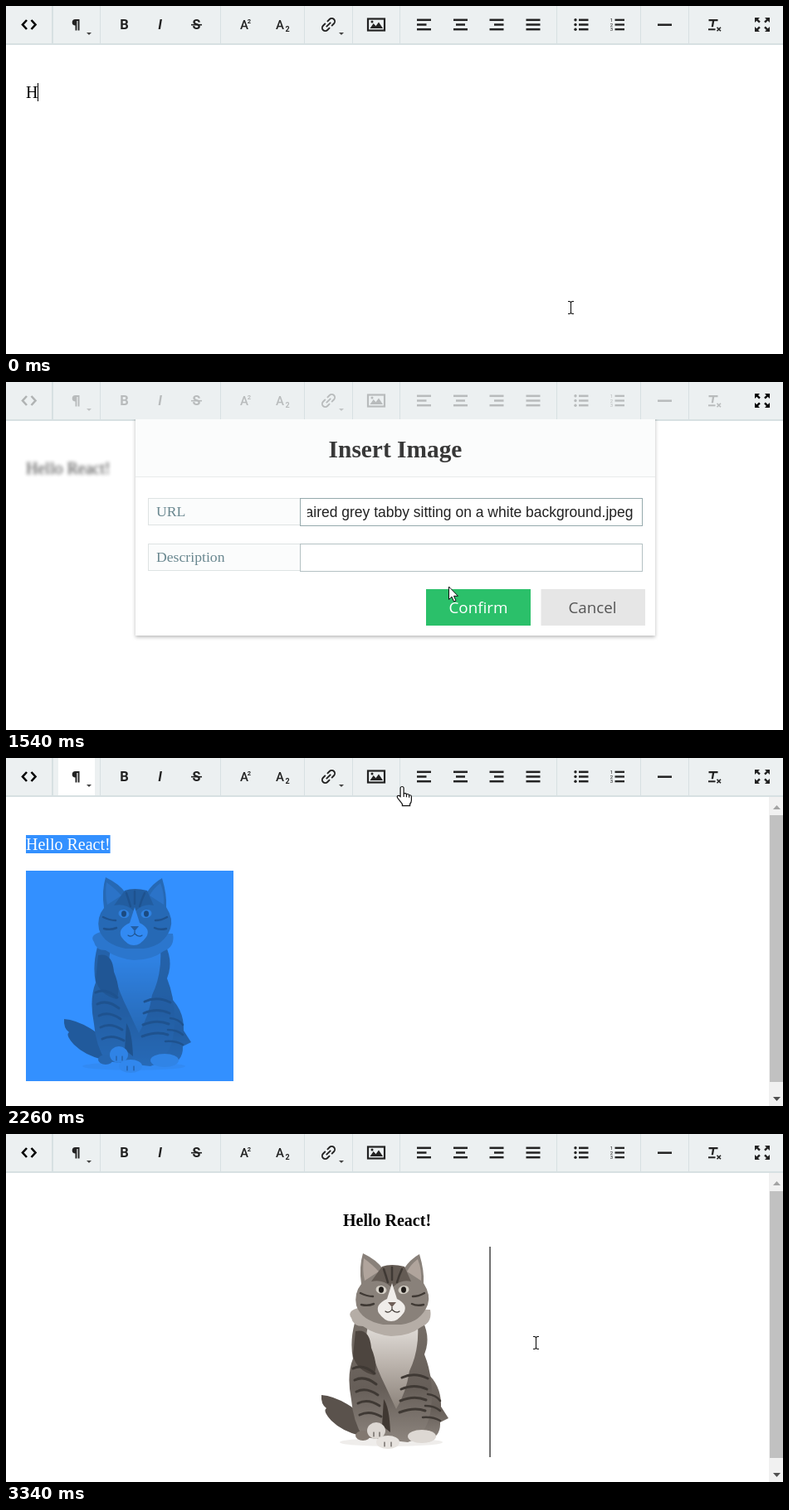
An HTML page that plays this animation: 936x420 px, repeating every 3360 ms.

```html
<!DOCTYPE html>
<html lang="en">
<head>
<meta charset="utf-8">
<title>Rich text editor</title>
<style>
html, body { margin: 0; width: 100%; height: 100%; overflow: hidden; background: #fff; }
svg { display: block; width: 936px; height: 420px; }
.serif { font-family: "Liberation Serif", Times, serif; }
.icon { font-family: Roboto, Inter, sans-serif; font-weight: 700; text-anchor: middle; }
.path { font: 17.5px "Liberation Sans", Arial, sans-serif; fill: #222; }
.btn { font: 500 18.8px "Open Sans", "Noto Sans", sans-serif; text-anchor: middle; }
.label { font-size: 17.7px; fill: #69878f; }
.panel { filter: drop-shadow(0 2px 2px rgba(0,0,0,.27)); }
</style>
</head>
<body>
<svg viewBox="0 0 936 420">
  <defs>
    <clipPath id="below"><rect y="45" width="936" height="375"/></clipPath>
    <clipPath id="field"><rect x="363" y="141" width="394" height="32"/></clipPath>
    <linearGradient id="fur" x1="0" y1="0" x2="0" y2="1">
      <stop offset="0" stop-color="#766e67"/><stop offset=".55" stop-color="#665e58"/><stop offset="1" stop-color="#8d857e"/>
    </linearGradient>
    <linearGradient id="chest" x1="0" y1="0" x2="0" y2="1">
      <stop offset="0" stop-color="#e4e0dc"/><stop offset=".5" stop-color="#b9b1aa"/><stop offset="1" stop-color="#8b827a"/>
    </linearGradient>
  </defs>
  <rect width="936" height="420" fill="#fff"/>

  <g id="photo">
    <rect width="250" height="254" fill="#fff"/>
    <g id="cat"></g>
    <rect id="tint" width="250" height="254" fill="#3390ff" style="mix-blend-mode:multiply"/>
  </g>
  <rect id="mark" y="93" height="22" fill="#3390ff"/>
  <text id="line" class="serif" y="111" font-size="20"></text>
  <rect id="caret" y="93" width="1" height="22" fill="#000"/>

  <g id="scroll">
    <rect x="919" y="47" width="17" height="373" fill="#f1f1f1"/>
    <rect x="920" y="69" width="16" height="322" fill="#c1c1c1"/>
    <path d="M924 62l4.5-5 4.5 5z" fill="#a3a3a3"/>
    <path d="M924 409l4.5 5 4.5-5z" fill="#505050"/>
  </g>

  <rect width="936" height="45" fill="#ecf0f1"/>
  <rect y="45" width="936" height="2" fill="#d7e0e2"/>
  <g id="hovers" fill="#fff"></g>
  <g id="seps" fill="#d7e0e2"></g>
  <g id="icons" fill="#222"></g>
  <g id="full" transform="translate(911 22.5)"></g>

  <g clip-path="url(#below)"><g id="modal">
    <rect class="panel" x="156" y="40" width="626" height="266" fill="#fff"/>
    <rect x="156" y="40" width="626" height="74" fill="#fbfcfc"/>
    <rect x="156" y="114" width="626" height="1" fill="#e9ecec"/>
    <text class="serif" x="469" y="91" font-size="29.4" font-weight="700" fill="#383838" text-anchor="middle">Insert Image</text>
    <g id="rows"></g>
    <g clip-path="url(#field)"><text id="path" class="path" y="163"></text></g>
    <rect id="ok" x="506" y="250" width="126" height="44"/>
    <text class="btn" x="569" y="279" fill="#fff">Confirm</text>
    <rect x="644.5" y="250" width="125.5" height="44" fill="#e6e6e6"/>
    <text class="btn" x="706.5" y="279" fill="#555">Cancel</text>
  </g></g>

  <g id="pointer">
    <path id="beam" d="M-3 -7.5H-1L.5 -6.5L2 -7.5H4M.5 -6.5V6.5M-3 7.5H-1L.5 6.5L2 7.5H4" fill="none" stroke="#111" stroke-width="1.1"/>
    <path id="arrow" d="M.5 0V15.5L4 12.2L6.6 18L9 17L6.5 11.3H11.5Z" fill="#fff" stroke="#111"/>
    <path id="hand" d="M-2 12V2a2 2 0 0 1 4 0V8.5q2.6-1.2 3.3.8q2.5-.9 3.2 1q2.8-.4 2.8 2.2v4q0 2.5-1.8 4.5v2.2H.3v-2q-2-3-5.6-7.4q-1.2-2 .2-2.8q1.5-.4 3.1 1zM2 8.5v4M5.3 9.3v3.5M8.5 10.3v3" fill="#fff" stroke="#111" stroke-width="1.2"/>
  </g>
</svg>
<script>
const LOOP = 3360;
const $ = id => document.getElementById(id);
const set = (el, attrs) => { for (const k in attrs) el.setAttribute(k, attrs[k]); };
const show = (id, on) => set($(id), { display: on ? 'inline' : 'none' });
const clamp = v => Math.max(0, Math.min(1, v));
const ramp = (t, a, b) => clamp((t - a) / (b - a));
const swing = p => .5 - Math.cos(Math.PI * p) / 2;

// ---- toolbar ----
const buttons = [27, 85, 142, 186, 229, 288, 333, 389, 446, 503, 547, 591, 635, 692, 736, 793, 852];
$('hovers').innerHTML = buttons.map(x => `<rect x="${x - 22}" width="44" height="45"/>`).join('');
$('seps').innerHTML = '<rect x="55" width="2" height="45"/>' +
  [113, 258, 359, 417, 474, 663, 764, 822].map(x => `<rect x="${x}" width="1" height="45"/>`).join('');

const bar = (x, y, w, h = 2.5) => `<rect x="${x}" y="${y - h / 2}" width="${w}" height="${h}"/>`;
const glyph = (s, x, y, size, extra = '') => `<text class="icon" x="${x}" y="${y}" font-size="${size}" ${extra}>${s}</text>`;
const rowsY = [16.8, 22.5, 28.2];
const align = (x, mid, w) => rowsY.map((y, i) => i == 1 ? bar(mid, y, w) : bar(x, y, 17)).join('');
const drop = x => `<path d="M${x} 32h6l-3 3z" fill="#444"/>`;

$('icons').innerHTML = [
  '<path d="M25 17l-5 5.5 5 5.5M30.5 17l5 5.5-5 5.5" fill="none" stroke="#000" stroke-width="2.6"/>',
  '<path d="M88.5 16h-5a3.8 3.8 0 0 0 0 7.6v6h1.9V18h1.2v11.6h1.9z"/>', drop(97),
  glyph('B', 142.5, 28.3, 16.5),
  glyph('I', 185.5, 28.3, 16.5, 'font-style="italic"'),
  glyph('S', 229.5, 28.3, 16), bar(223, 22.7, 13, 1.6),
  glyph('A', 287, 28, 15, 'style="font-weight:500"'), glyph('2', 293, 21, 7.5),
  glyph('A', 330, 28, 15, 'style="font-weight:500"'), glyph('2', 339, 31, 9),
  '<path transform="translate(388.5 22.5) rotate(-45)" d="M-1.5-3.7h-4a3.7 3.7 0 0 0 0 7.4h4M1.5-3.7h4a3.7 3.7 0 0 1 0 7.4h-4M-3.8 0h7.6" fill="none" stroke="#222" stroke-width="1.9"/>',
  drop(401),
  '<rect x="436" y="15.5" width="20" height="14" fill="none" stroke="#222" stroke-width="2.2"/>',
  '<path d="M438.5 27l4.2-6 2.8 3.3 3.5-4.8 5 7.5z"/><circle cx="441" cy="19" r="1.5"/>',
  align(495, 495, 11.5), align(539, 542, 11), align(582.5, 588, 11.5), align(626.5, 626.5, 17),
  rowsY.map(y => `<circle cx="686" cy="${y}" r="1.7"/>` + bar(690, y, 11.5)).join(''),
  rowsY.map((y, i) => glyph(i + 1, 729.5, y + 2, 6, 'style="font-weight:400"') + bar(733.5, y, 11.5, 2.3)).join(''),
  bar(785, 22.7, 17),
  '<path d="M846.5 16h11v2.2h-4.3l-1.2 7h-2.3l1.2-7h-4.4z"/>', bar(846, 28.3, 8.5, 2),
  '<path d="M856.5 25.8l4.5 4.5m0-4.5l-4.5 4.5" stroke="#222" stroke-width="1.6"/>'
].join('');

$('full').innerHTML = [[1, 1], [-1, 1], [1, -1], [-1, -1]].map(([a, b]) =>
  `<path transform="scale(${a} ${b})" d="M-9-8.5h6l-2 2 2.8 2.8-1.7 1.7-2.8-2.8-2.3 2.3z"/>`).join('');

// ---- dialog ----
$('rows').innerHTML = [['URL', 140], ['Description', 195]].map(([name, y]) =>
  `<rect x="171.5" y="${y + .5}" width="183" height="32" fill="#fbfcfc" stroke="#dee3e3"/>
   <text class="serif label" x="181" y="${y + 22}">${name}</text>
   <rect class="box" x="354.5" y="${y + .5}" width="412" height="33" fill="#fff"/>`).join('');
const boxes = document.querySelectorAll('.box');
const picture = 'pictures/animals/cats/long haired grey tabby sitting on a white background.jpeg';

// ---- photo, reduced to flat shapes ----
const fill = (d, c) => `<path d="${d}" fill="${c}"/>`;
const dab = (x, y, rx, ry, c, a = 0) => `<ellipse cx="${x}" cy="${y}" rx="${rx}" ry="${ry}" fill="${c}" transform="rotate(${a} ${x} ${y})"/>`;
const stripe = (d, w = 2.5) => `<path d="${d}" fill="none" stroke="#3f3934" stroke-width="${w}" stroke-linecap="round"/>`;
$('cat').style.filter = 'blur(.5px)';
$('cat').innerHTML = [
  dab(130, 236, 62, 5, '#efedeb'),
  fill('M46 179Q60 180 77 190Q98 202 103 226L92 228Q70 222 58 210Q47 198 52 195Q45 190 46 179Z', '#5a524c'),
  fill('M168 148Q191 165 190 193L199 207L189 212Q190 232 168 236Q150 236 148 220Z', 'url(#fur)'),
  fill('M86 92Q80 115 84 135Q76 155 82 185Q84 210 96 230L150 236Q174 228 178 195Q182 160 170 130Q178 110 168 90Z', 'url(#fur)'),
  fill('M104 92Q96 108 106 126Q114 150 122 166L136 196Q148 176 152 150Q164 125 162 94Z', 'url(#chest)'),
  fill('M90 74Q76 78 82 86Q84 96 96 96Q110 106 130 108Q152 108 166 97Q180 92 177 76Z', '#b5ada6'),
  fill('M96 8Q113 16 120 27L145 27Q153 15 164 9Q170 29 169 44Q178 58 174 70Q166 91 142 94L120 94Q94 89 88 71Q85 56 94 45Q91 24 96 8Z', '#89817a'),
  fill('M97 14Q108 22 115 30L98 41Q95 28 97 14ZM162 15Q153 22 149 30L166 41Q167 28 162 15Z', '#b0a49c'),
  fill('M119 24Q130 20 146 24L154 42Q142 39 133 48L129 48Q120 39 106 42Z', '#645b54'),
  stripe('M121 27Q124 36 126 43'), stripe('M131 25V40'), stripe('M143 27Q139 36 137 43'),
  stripe('M93 56Q101 60 108 60'), stripe('M170 56Q163 60 156 60'), stripe('M94 70Q102 72 109 69'), stripe('M169 70Q161 72 155 69'),
  fill('M131 44L137 63Q151 70 145 80Q138 90 130 90Q122 90 115 80Q110 70 125 63Z', '#f0edea'),
  dab(118, 52, 6.5, 5, '#d5d0c7', 12), dab(145, 52, 6.5, 5, '#d5d0c7', -12),
  dab(118, 52, 3, 3.7, '#211d1a'), dab(145, 52, 3, 3.7, '#211d1a'),
  fill('M126 67H136L131 73Z', '#6f5f58'), stripe('M131 73V76Q127 81 123 78M131 76Q136 81 140 78', 1.2),
  fill('M87 102Q104 98 106 122Q115 144 109 155Q89 150 84 132Z', '#4d453f'),
  [0, 1, 2, 3, 4].map(i => stripe(`M${84 + i * 2} ${147 + i * 14}Q${96 + i * 2} ${141 + i * 14} ${110 + i * 2} ${153 + i * 13}`, 3)).join(''),
  [0, 1, 2, 3].map(i => stripe(`M${143 - i} ${158 + i * 14}Q158 ${151 + i * 14} ${174 - i} ${159 + i * 13}`, 3)).join(''),
  [0, 1, 2].map(i => stripe(`M${174 - i * 3} ${178 + i * 14}Q${184 - i * 2} ${179 + i * 13} 189 ${186 + i * 12}`)).join(''),
  fill('M121 184Q128 194 129 224L119 216Z', '#403832'),
  dab(96, 228, 9, 6, '#827870'), dab(112, 222, 11, 10, '#dcd7d2'), dab(126, 236, 14, 8, '#e7e3df'), dab(167, 229, 17, 8, '#ddd8d3'),
  stripe('M122 236v5M130 236v5M109 224v5M116 224v5', 1)
].join('');

// ---- motion ----
const track = [
  [60, 680, 364], [540, 704, 367], [840, 704, 367], [1060, 446, 26], [1400, 446, 26],
  [1540, 533, 247], [1640, 549, 260], [1740, 549, 260], [1860, 286, 345], [1940, 62, 150],
  [2020, 24, 104], [2080, 24, 104], [2320, 552, 23], [2500, 552, 23], [2660, 658, 104],
  [2760, 520, 104], [2940, 149, 26], [3020, 149, 26], [3220, 638, 252]
];
function place(t) {
  const i = track.findIndex(k => k[0] > t);
  if (i == 0) return track[0].slice(1);
  if (i < 0) return track[track.length - 1].slice(1);
  const a = track[i - 1], b = track[i], p = swing(ramp(t, a[0], b[0]));
  return [a[1] + (b[1] - a[1]) * p, a[2] + (b[2] - a[2]) * p];
}
const inside = (x, y, l, t, r, b) => x >= l && x <= r && y >= t && y <= b;
function pointerKind(x, y, open) {
  if (y < 46) return 'hand';
  if (!open) return 'beam';
  if (inside(x, y, 506, 250, 632, 294)) return 'hand';
  return inside(x, y, 355, 140, 767, 173) || inside(x, y, 355, 195, 767, 228) ? 'beam' : 'arrow';
}

function render(t) {
  const open = t >= 1120 && t < 1840;
  const [x, y] = place(t);
  const kind = pointerKind(x, y, open);
  set($('pointer'), { transform: `translate(${x} ${y})` });
  for (const k of ['beam', 'arrow', 'hand']) show(k, k == kind);

  // toolbar
  const dim = ramp(t, 1120, 1200) - ramp(t, 1700, 1760);
  set($('icons'), { opacity: 1 - .75 * dim });
  set($('full'), { fill: dim > 0 ? '#000' : '#222' });
  const active = ramp(t, 240, 300) - ramp(t, 1120, 1180) + ramp(t, 2020, 2060) - ramp(t, 3220, 3280);
  [...$('hovers').children].forEach((r, i) => {
    const over = !open && y < 45 && Math.abs(x - buttons[i]) < 22;
    set(r, { opacity: over ? 1 : i == 1 ? active : 0 });
  });

  // text line
  const count = t < 60 ? 1 : t < 620 ? Math.min(10, 2 + Math.floor((t - 60) / 60)) : t < 840 ? 11 : 12;
  const bold = t >= 2980, centred = t >= 2460, picked = t >= 2000 && t < 3240;
  const width = bold ? 106 : 101.6;
  const left = centred ? 459 - width / 2 : 24;
  const line = $('line');
  line.textContent = 'Hello React!'.slice(0, count);
  set(line, { x: left, 'font-weight': bold ? 700 : 400, fill: picked ? '#fff' : '#000' });
  const haze = ramp(t, 1120, 1200) - ramp(t, 1740, 1850);
  line.style.filter = haze > 0 ? `blur(${2.3 * haze}px)` : 'none';
  set(line, { opacity: 1 - .25 * haze });
  show('mark', picked);
  set($('mark'), { x: left, width });

  // caret: beside the text, later beside the photo
  const late = t >= 3240;
  show('caret', t < 1120 || late);
  set($('caret'), late ? { x: 582.3, y: 136, width: 1.5, height: 254, fill: '#444' }
    : { x: Math.floor(24 + line.getComputedTextLength()), y: 93, width: 1, height: 22, fill: '#000' });

  // photo
  const tinted = t >= 1880 && t < 2460;
  show('photo', t >= 1700);
  show('scroll', t >= 1700);
  show('tint', tinted);
  set($('photo'), { transform: `translate(${centred ? 334 : 24} 136)`, opacity: 1 - .8 * haze });
  set($('cat'), { opacity: tinted ? .55 : 1 });

  // dialog
  const slide = swing(ramp(t, 1120, 1260)) - swing(ramp(t, 1700, 1840));
  show('modal', open);
  set($('modal'), { transform: `translate(0 ${-270 * (1 - slide)})` });
  const focused = t < 1680;
  set(boxes[0], { stroke: focused ? '#95a9ac' : '#dedede' });
  set(boxes[1], { stroke: focused ? '#b4c1c3' : '#dedede' });
  $('path').textContent = t < 1400 ? '' : picture;
  set($('path'), { x: focused ? 755.5 : 363.5, 'text-anchor': focused ? 'end' : 'start' });
  set($('ok'), { fill: kind == 'hand' && y > 200 ? '#2aab60' : '#2bc06a' });
}

const start = performance.now();
function tick() {
  render((performance.now() - start) % LOOP);
  requestAnimationFrame(tick);
}
render(0);
requestAnimationFrame(tick);
</script>
</body>
</html>
```
